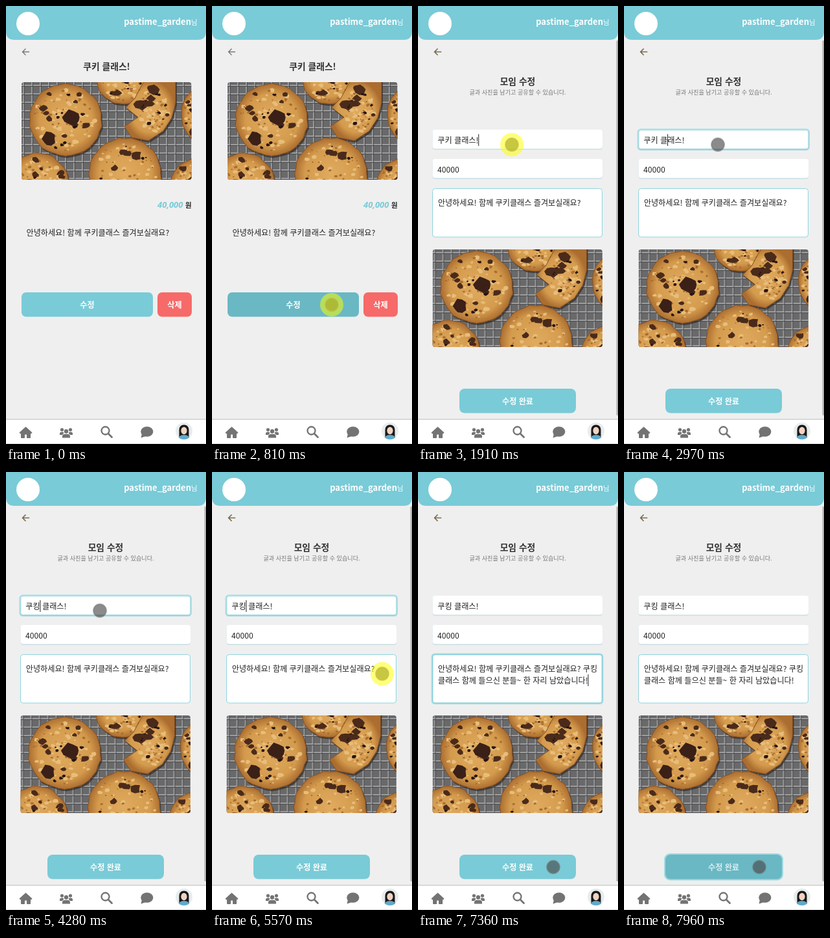
Animation of 309 by 673 pixels, one loop 8000 ms. Source, as an HTML page:

```html
<!DOCTYPE html>
<html lang="ko">
<head>
<meta charset="utf-8">
<title>모임 수정</title>
<style>
  html, body { margin: 0; height: 100%; overflow: hidden; background: #efefef; }
  svg { display: block; width: 100vw; height: 100vh; }
  text {
    font: 500 12.13px "Noto Sans CJK KR", "Noto Sans CJK JP", "Noto Sans CJK", sans-serif;
    fill: #222; white-space: pre;
  }
  .mid { text-anchor: middle; }
  .heading { font-size: 13.8px; font-weight: 700; fill: #333; }
  .label { font-weight: 700; fill: #fff; text-anchor: middle; }
  .teal { fill: #79cbd7; }
  .ring { fill: none; stroke: #79cbd7; stroke-opacity: .55; stroke-width: 3; }
  .line { fill: none; stroke-linecap: round; stroke-linejoin: round; }
</style>
</head>
<body>
<svg viewBox="0 0 309 673">
  <defs>
    <pattern id="rack" width="13" height="13" patternUnits="userSpaceOnUse">
      <rect width="13" height="13" fill="#69696a"/>
      <path d="M3 0V13M0 5H13" stroke="#b3b4b5" stroke-width="1.3"/>
      <path d="M4.4 0V13M0 6.4H13" stroke="#47484a"/>
    </pattern>
    <radialGradient id="dough">
      <stop offset="0" stop-color="#e0ab60"/>
      <stop offset=".72" stop-color="#d49b4d"/>
      <stop offset="1" stop-color="#ab6d30"/>
    </radialGradient>
    <clipPath id="frame"><rect width="262.5" height="150" rx="4"/></clipPath>
    <g id="photo" clip-path="url(#frame)">
      <rect width="263" height="150" fill="url(#rack)"/>
      <g id="cookies"></g>
    </g>
    <path id="arrow" class="line" d="M35.5 70.5H25.5M30 66L25.5 70.5L30 75"/>
  </defs>
  <rect width="309" height="673" fill="#efefef"/>

  <g id="detail">
    <use href="#arrow" stroke="#777" stroke-width="1.4"/>
    <text class="heading mid" x="155.5" y="98">쿠키 클래스!</text>
    <use href="#photo" x="24" y="117"/>
    <text x="234" y="310" style="font:italic 700 13px 'Open Sans',sans-serif;fill:#79cbd7">40,000</text>
    <text x="277" y="310" style="font-size:10.5px;font-weight:700">원</text>
    <text x="31.5" y="353">안녕하세요! 함께 쿠키클래스 즐겨보실래요?</text>
    <rect id="editButton" class="teal" x="24" y="440" width="203" height="37.5" rx="7"/>
    <text class="label" x="125.5" y="463.5">수정</text>
    <rect x="234" y="440" width="53" height="37.5" rx="7" fill="#f66a69"/>
    <text class="label" x="260.5" y="463.5">삭제</text>
  </g>

  <g id="edit">
    <use href="#arrow" stroke="#7b6a50" stroke-width="1.7"/>
    <text class="heading mid" x="154" y="121">모임 수정</text>
    <text class="mid" x="154" y="136" style="font-size:9.1px;fill:#777">글과 사진을 남기고 공유할 수 있습니다.</text>
    <g fill="#b4d3da">
      <rect x="22.5" y="191" width="262.5" height="29.5" rx="4"/>
      <rect x="22.5" y="236" width="262.5" height="29.5" rx="4"/>
    </g>
    <g fill="#fff">
      <rect x="22.5" y="190" width="262.5" height="29.5" rx="4"/>
      <rect x="22.5" y="235" width="262.5" height="29.5" rx="4"/>
      <rect x="22.5" y="280.5" width="262" height="74.5" rx="4" stroke="#8fd5e0"/>
    </g>
    <rect id="titleRing" class="ring" x="22" y="190" width="263.5" height="30.5" rx="4"/>
    <rect id="areaRing" class="ring" x="22" y="280" width="263" height="75.5" rx="4"/>
    <text id="titleText" x="30.3" y="210.5"></text>
    <text x="30" y="256">40000</text>
    <text id="line1" x="30.8" y="306.5"></text>
    <text id="line2" x="30.8" y="325"></text>
    <path id="caret" d="M0 -9V9" stroke="#222"/>
    <use href="#photo" x="22.5" y="374"/>
    <rect id="doneRing" x="62" y="586" width="184" height="41.5" rx="9" fill="#a0d8e0"/>
    <rect id="doneButton" class="teal" x="64" y="588" width="180" height="37.5" rx="8"/>
    <text id="doneLabel" class="label" x="154" y="611.5">수정 완료</text>
    <rect x="306.5" y="53" width="2.5" height="576" rx="1" fill="#b2b2b2"/>
  </g>

  <path class="teal" d="M0 0H309V39Q309 52 296 52H13Q0 52 0 39Z"/>
  <circle cx="34" cy="27" r="18" fill="#fff"/>
  <text x="286" y="29" text-anchor="end" style="font-size:13px;font-weight:700;fill:#fff">pastime_garden</text>
  <text x="286" y="29" style="font-size:10.5px;fill:#fff">님</text>

  <rect y="634" width="309" height="39" fill="#d6d9d9"/>
  <rect y="636" width="309" height="36" fill="#fff"/>
  <g fill="#737373">
    <path d="M30.5 647L40 655.5L39 656.8H37.5V663.5H32.5V658H28.5V663.5H23.5V656.8H22L21 655.5Z" stroke="#737373" stroke-linejoin="round"/>
    <circle cx="86.5" cy="651" r="2.6"/><circle cx="99.5" cy="651" r="2.6"/><circle cx="93" cy="653.5" r="3.2"/>
    <path d="M83 659V657Q83 654.5 86 654.5H88Q89 655 89.5 656L87 659ZM103 659V657Q103 654.5 100 654.5H98Q97 655 96.500 656L99 659ZM87 663.500V661.500Q87 657.800 91 657.800H95Q99 657.800 99 661.500V663.500Z"/>
    <circle cx="153.5" cy="652.500" r="6" fill="none" stroke="#737373" stroke-width="2.300"/>
    <path class="line" d="M158.500 657.500L163.500 662.500" stroke="#737373" stroke-width="2.800"/>
    <ellipse cx="217.800" cy="654" rx="9.600" ry="7.800"/>
    <path d="M210 657L208.500 663.500L216 661Z"/>
  </g>
  <circle cx="275" cy="653" r="13" fill="#e9ecec"/>
  <path d="M267.500 663V651Q268 643.500 275 643.500Q282 643.500 282.500 651V663Z" fill="#17191c"/>
  <ellipse cx="275" cy="652.500" rx="4.600" ry="5.800" fill="#f4d2bf"/>
  <path d="M267 663.500Q268 659 275 659Q282 659 283 663.500Q275 668.500 267 663.500Z" fill="#5fa9cc"/>

  <g id="status">
    <path d="M0 650H99Q102 650 102 653V672H0Z" fill="#dee1e6"/>
    <text x="5" y="666" style="font:12px Roboto,'Noto Sans',sans-serif;fill:#444">api.mandarin.w...</text>
  </g>

  <g id="cursor">
    <circle r="10" fill="#444" fill-opacity=".62" stroke="#777" stroke-opacity=".6" stroke-width="1.8"/>
    <circle id="click" r="18" fill="#ff0" fill-opacity=".52"/>
  </g>
</svg>
<script>
const LOOP = 8000, BLINK = 530;
const el = Object.fromEntries([...document.querySelectorAll('[id]')].map(node => [node.id, node]));

// Photo: wobbly cookies with seeded chips, crumbs and cracks
let seed = 11;
const random = () => (seed = seed * 16807 % 2147483647) / 2147483647;
const blob = (cx, cy, rx, ry, wobble, count) => 'M' + Array.from({ length: count }, (_, i) => {
  const angle = i / count * 2 * Math.PI, k = 1 + (random() - .5) * wobble;
  return `${(cx + rx * k * Math.cos(angle)).toFixed(1)} ${(cy + ry * k * Math.sin(angle)).toFixed(1)}`;
}).join('L') + 'Z';

function cookie(cx, cy, rx, ry, outline) {
  const shape = outline || blob(cx, cy, rx, ry, .05, 36);
  const scatter = (count, size, fill) => Array.from({ length: count }, () => {
    const angle = random() * 2 * Math.PI, d = Math.sqrt(random()) * .86, r = size * (.5 + random());
    const path = blob(cx + rx * d * Math.cos(angle), cy + ry * d * Math.sin(angle), r, r * .75, .6, 8);
    return `<path d="${path}" fill="${fill}"/>`;
  }).join('');
  return `<path d="${shape}" transform="translate(2 3)" fill="#2a211c" opacity=".6"/>
    <path d="${shape}" fill="url(#dough)" stroke="#86501f"/>`
    + scatter(45, 3, '#e8bd7a') + scatter(40, 1.7, '#a96d30') + scatter(9, 6, '#4a2a1a') + scatter(9, 2.5, '#26150f');
}
const brokenEdge = 'M190 -3H238V32L232 55L219 75L196 90L170 85L159 68L180 54L161 39L175 25Z';
el.cookies.innerHTML = cookie(157, -8, 42, 42) + cookie(68, 58, 56, 55) + cookie(205, 42, 26, 40, brokenEdge)
  + cookie(25, 156, 47, 47) + cookie(275, 50, 28, 40) + cookie(270, 158, 40, 40) + cookie(160, 141, 56, 55)
  + `<path d="${blob(78, 54, 14, 11, .4, 10)}${blob(42, 87, 11, 10, .4, 10)}" fill="#3a2017"/>`;

// Timeline: [time, ...values]
const titles = [[0, '쿠키 클래스!'], [3630, '쿠 클래스!'], [3890, '쿠ㅋ 클래스!'], [4020, '쿠키 클래스!'], [4280, '쿠킹 클래스!']];
const titleCarets = [[1910, 7], [2710, 6], [2840, 5], [2970, 4], [3110, 3], [3230, 2],
  [3630, 1], [3760, 1], [3890, 2], [4020, 2], [4280, 2]];
const cursorPath = [[330, 250, 560], [600, 185, 459], [1100, 185, 459], [1210, 178, 408], [1280, 178, 408],
  [1800, 145, 213], [5010, 145, 213], [5440, 263, 310], [5770, 263, 310], [5980, 270, 347],
  [7000, 270, 347], [7220, 218, 640], [7360, 209, 607]];
const clicks = [620, 1850, 5500, 7620], CLICK_LENGTH = 200;
const greeting = '안녕하세요! 함께 쿠키클래스 즐겨보실래요?';
const added1 = ' 쿠킹', added2 = '클래스 함께 들으신 분들~ 한 자리 남았습니다!';
const OPEN = 830, AREA_FOCUS = 5700, TYPE_START = 6540, TYPE_END = 7090, SUBMIT = 7820;

const ramp = (t, from, to) => Math.min(1, Math.max(0, (t - from) / (to - from)));
const current = (list, t) => list.filter(item => item[0] <= t).pop();
const show = (node, on) => node.setAttribute('visibility', on ? 'inherit' : 'hidden');
const blinkOn = age => Math.floor(age / BLINK) % 2 === 0;

function cursorAt(t) {
  const i = Math.max(0, cursorPath.filter(p => p[0] <= t).length - 1);
  const [t0, x0, y0] = cursorPath[i], [t1, x1, y1] = cursorPath[i + 1] || [LOOP, x0, y0];
  const u = ramp(t, t0, t1), k = u * u * (3 - 2 * u);
  return [x0 + (x1 - x0) * k, y0 + (y1 - y0) * k];
}

function placeCaret(t) {
  let line = el.titleText, count = 0, y = 206, since = 0;
  if (t < AREA_FOCUS) {
    [since, count] = current(titleCarets, t) || [0, 0];
  } else if (t < SUBMIT) {
    line = el.line2.textContent ? el.line2 : el.line1;
    count = line.textContent.length;
    y = line === el.line2 ? 320 : 302;
    since = t < TYPE_START ? AREA_FOCUS - 20 : Math.min(t, TYPE_END);
  }
  show(el.caret, count > 0 && blinkOn(t - since));
  if (count) {
    const x = +line.getAttribute('x') + line.getSubStringLength(0, count) + .3;
    el.caret.setAttribute('transform', `translate(${x} ${y})`);
  }
}

function render(t) {
  show(el.detail, t < OPEN);
  show(el.edit, t >= OPEN);
  show(el.status, t >= 900 && t < 1500);
  el.editButton.style.fill = t >= 650 ? '#69b8c4' : '';

  const typed = t < TYPE_START ? 0 : 1 + Math.floor(ramp(t, TYPE_START, TYPE_END) * (added1.length + added2.length - 1));
  el.titleText.textContent = current(titles, t)[1];
  el.line1.textContent = greeting + added1.slice(0, typed);
  el.line2.textContent = added2.slice(0, Math.max(0, typed - added1.length));
  placeCaret(t);

  el.titleRing.style.opacity = ramp(t, 1910, 2240) - ramp(t, AREA_FOCUS, 5840);
  el.areaRing.style.opacity = ramp(t, AREA_FOCUS, 5980) - ramp(t, SUBMIT - 40, 7960);
  const pressed = ramp(t, SUBMIT - 40, 7940);
  el.doneRing.style.opacity = pressed;
  el.doneButton.style.fill = pressed ? '#69b8c4' : '';
  el.doneLabel.style.opacity = 1 - .25 * pressed;

  show(el.cursor, t >= 330);
  show(el.click, clicks.some(start => t >= start && t < start + CLICK_LENGTH));
  el.cursor.setAttribute('transform', `translate(${cursorAt(t)})`);
}

const begin = performance.now();
function tick() {
  render((performance.now() - begin) % LOOP);
  requestAnimationFrame(tick);
}
tick();
</script>
</body>
</html>
```
